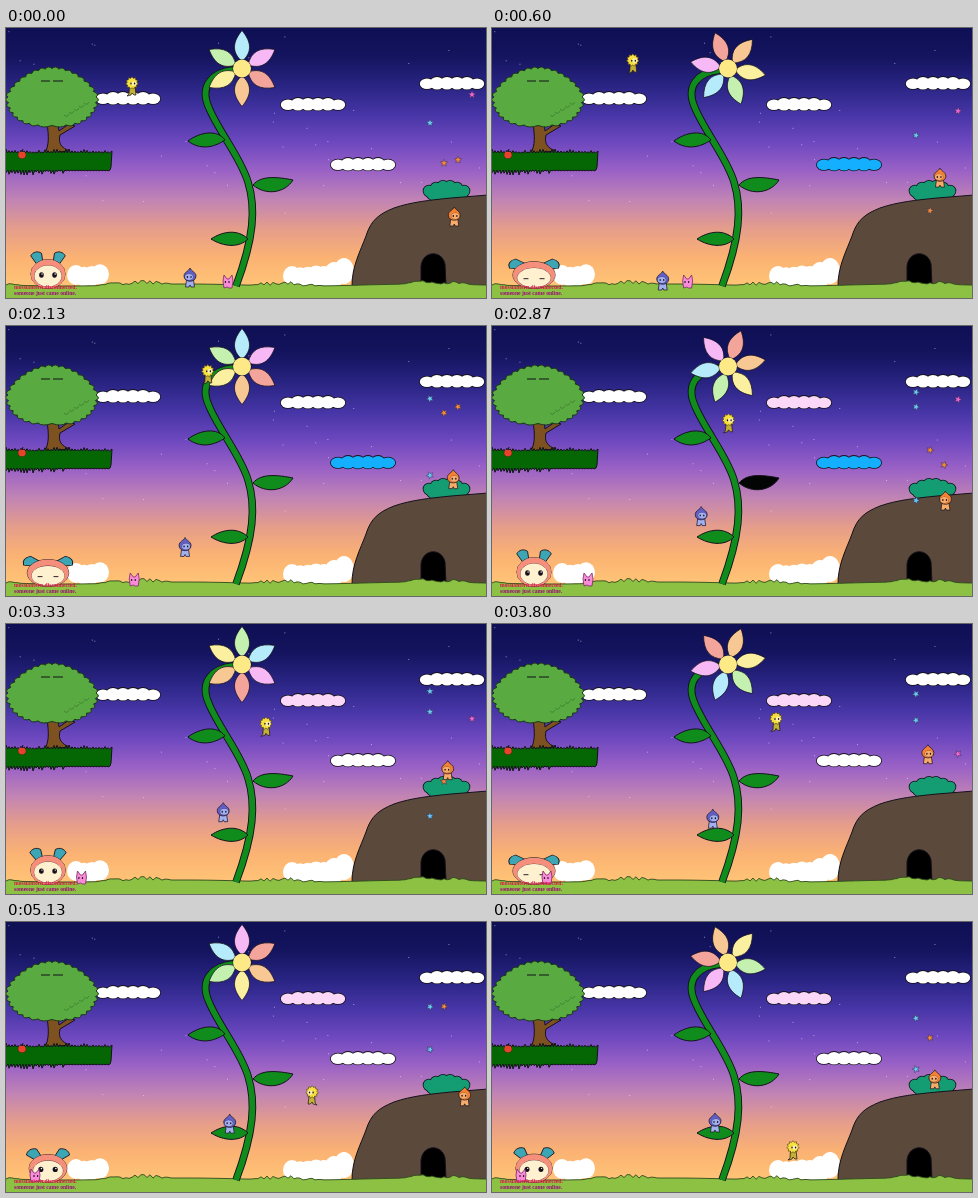
An HTML page with a canvas for the animation above (5870 ms loop, 480 by 270 pixels).

```html
<!DOCTYPE html>
<html lang="en">
<head>
<meta charset="utf-8">
<style>
html, body { margin: 0; width: 100%; height: 100%; overflow: hidden; }
canvas { display: block; width: 480px; height: 270px; }
</style>
</head>
<body>
<canvas id="stage" width="480" height="270"></canvas>
<script>
const c = document.getElementById('stage').getContext('2d');
const LOOP = 5870, STEP = 200 / 3, LAST = 87, TAU = Math.PI * 2;
const INK = '#15111c', GREEN = '#0f8c1c';

function shape(d, fill, line = INK, width = 1) {
  const p = new Path2D(d);
  if (fill) { c.fillStyle = fill; c.fill(p); }
  if (line) { c.strokeStyle = line; c.lineWidth = width; c.stroke(p); }
}

function oval(x, y, rx, ry, fill, line = INK, width = 0.8) {
  c.beginPath();
  c.ellipse(x, y, rx, ry, 0, 0, TAU);
  if (line) { c.strokeStyle = line; c.lineWidth = width; c.stroke(); }
  c.fillStyle = fill;
  c.fill();
}

// Several ovals joined under one outline
function blob(fill, ovals) {
  for (const o of ovals) oval(...o, INK, INK, 1.6);
  for (const o of ovals) oval(...o, fill, null);
}

function at(x, y, draw, sx = 1, sy = 1, turn = 0) {
  c.save();
  c.translate(x, y);
  c.rotate(turn);
  c.scale(sx, sy);
  draw();
  c.restore();
}

// Closed outline with count corners, alternating between two radii
function spiky(count, outer, inner) {
  let d = 'M';
  for (let i = 0; i < count * 2; i++) {
    const r = i % 2 ? inner : outer, a = i * Math.PI / count;
    d += `${i ? 'L' : ''}${Math.sin(a) * r} ${-Math.cos(a) * r}`;
  }
  return d + 'Z';
}

const repeat = (count, make) => Array.from({ length: count }, (_, i) => make(i));
const noise = i => Math.abs(Math.sin(i * 12.9898) * 43758.5453) % 1;
const during = (n, from, to, color, rest) => n >= from && n < to ? color : rest;

// Smooth curve through evenly timed points
function spline(points, n) {
  const t = n / LAST * (points.length - 1);
  const i = Math.min(points.length - 2, Math.floor(t)), k = t - i;
  const p = j => points[Math.max(0, Math.min(points.length - 1, i + j))];
  return [0, 1].map(v => {
    const a = p(-1)[v], b = p(0)[v], e = p(1)[v], f = p(2)[v];
    return b + k / 2 * (e - a + k * (2 * a - 5 * b + 4 * e - f + k * (3 * (b - e) + f - a)));
  });
}

const sky = c.createLinearGradient(0, 0, 0, 258);
['#0f0f54', '#14145f', '#292483', '#4635a6', '#6e48bf', '#9b62c6', '#c184b4', '#e59d8b', '#fbb273', '#ffc476']
  .forEach((color, i) => sky.addColorStop(i / 9, color));

function backdrop() {
  c.fillStyle = sky;
  c.fillRect(0, 0, 480, 270);
  c.fillStyle = 'rgba(255,255,255,.5)';
  for (let i = 1; i < 36; i++) c.fillRect(noise(i) * 480, noise(i + 50) * 190, 1, 1);
  for (const x of [61, 277]) {
    const size = x < 100 ? 1 : 0.8;
    for (let i = 0; i < 4; i++) oval(x + 9 + i * 8, 252 - noise(i + 3) * 9 * size, 9, 10, '#fff', null);
  }
  for (let i = 0; i < 3; i++) oval(318 + i * 10, 251 - i * 4, 10, 13, '#fff', null);
}

function cloud(x, y, fill) {
  blob(fill, repeat(6, i => [x + 7 + i * 10, y + 0.8 - (i % 5 ? 0.6 : 0), 7.2, i % 5 ? 6.3 : 5.2]));
}

function clouds(n) {
  cloud(90, 70, '#fff');
  cloud(275, 76, during(n, 33, 88, '#fbd8f7', '#fff'));
  cloud(325, 136, during(n, 4, 50, '#14b0ff', '#fff'));
  cloud(414, 55, '#fff');
}

function tree() {
  shape('M39 125C43 117 43 109 41 95L52 95L53 103L63 96L69 98L54 107C52 115 55 120 64 123Z', '#7e5220');
  const edge = (i, grow) => {
    const a = i * TAU / 32, up = Math.sin(a), side = Math.cos(a);
    const wide = up > 0 ? Math.sign(side) * Math.abs(side) ** 0.7 : side * (1 + up * 0.22);
    return `${46 + wide * 44 * grow} ${69 + up * 28.5 * grow}`;
  };
  let d = 'M' + edge(0, 1);
  for (let i = 1; i <= 32; i++) d += `Q${edge(i - 0.5, 1.12)} ${edge(i, 1)}`;
  shape(d + 'Z', '#59aa40', '#1d3518');
  for (let i = 0; i < 5; i++) shape(`M${58 + i * 5} ${87 - i * 3}q3 3 5-1`, null, '#3d7c30', 0.8);
  shape('M35 53h9M47 53h10', null, INK, 1.2);
}

function ledge() {
  let top = 'M-2 146L-2 124', under = '';
  for (let x = 0; x <= 104; x += 3) {
    top += `L${x} ${121 + noise(x) * 3}L${x + 1.5} 125`;
    under = `L${x + 2} 142L${x} ${143 + noise(x + 9) * 4 * (x < 60)}` + under;
  }
  shape(top + 'L106 123L105 139' + under + 'Z', '#056604');
  oval(16, 127, 3.8, 3.4, '#e8432a');
  shape('M16 124L17 121', null);
}

function hill() {
  blob('#149d72', repeat(6, i => [423 + i * 7, 163 - 5 * Math.sin(i * Math.PI / 5), 5.5, 5.5])
    .concat([[441, 167, 20, 8]]));
  shape('M346 258C346 238 354 224 360 208C365 192 373 186 388 180C405 174 425 172 445 170L482 167L482 258Z', '#5b4a3c');
  shape('M415 257L415 238C417 222 436 222 439 236L440 257Z', '#000');
}

function ground() {
  let d = 'M-2 272L-2 257';
  for (let x = 0; x <= 484; x += 3) {
    const tuft = Math.max(0, Math.sin(x / 24 + 2.5)) * noise(x) * 5;
    d += `L${x} ${257 + Math.sin(x / 38) - tuft}`;
  }
  shape(d + 'L484 272Z', '#8cc144', '#2f4a1c', 0.9);
}

const petals = ['#f3a59b', '#f7c794', '#fbf0a0', '#c4f0b0', '#b6ebfb', '#f6b9f5'];

function flower(n) {
  const stem = 'M228 42C206 44 193 58 203 80C213 104 235 130 242 154C250 180 248 210 230 258';
  shape(stem, null, INK, 7.6);
  shape(stem, null, GREEN, 5.8);
  shape('M219 112C211 101 194 104 182 113C194 122 207 120 219 112Z', during(n, 16, 29, '#08300f', GREEN));
  shape('M247 157C255 147 272 149 287 152C279 165 260 168 247 157Z', during(n, 36, 49, '#030504', GREEN));
  shape('M242 211C232 201 217 203 205 211C218 219 233 220 242 211Z', GREEN);
  const turn = Math.floor(6.89 + 1.124 * n) * TAU / 18;
  petals.forEach((fill, i) => at(236, 40.5,
    () => shape('M0-7C-10-16-10-26 0-38C10-26 10-16 0-7Z', fill, INK, 0.7), 1, 1, turn + i * TAU / 6));
  oval(236, 40.5, 9, 9, '#fdea86');
}

// Each column drops stars that speed up as they fall
const columns = [
  { color: '#67c9f5', speed: 0.117, births: [-46, 10, 40] },
  { color: '#f58a35', speed: 0.277, births: [-30, 15.5, 61.5] },
  { color: '#f58a35', speed: 0.427, births: [-19, 23] },
  { color: '#f264d2', speed: 0.375, births: [-2, 35.7] }
];

function fallingStars(n) {
  columns.forEach(({ color, speed, births }, i) => {
    for (const born of births) {
      const y = 66 + (speed * (n - born)) ** 2;
      if (n >= born && y < 197) {
        at(424 + i * 14, y, () => shape(spiky(5, 3.8, 1.7), color, '#3b3158', 0.5), 1, 1, n * 0.3);
      }
    }
  });
}

function eyes(y) {
  oval(-1, y, 0.7, 1, INK, null);
  oval(2.6, y, 0.7, 1, INK, null);
}

function bulbHead(fill, pale) {
  shape('M-3.5 2L-4.5 9L-1 9L0 7L1 9L4.5 9L3.5 2Z', pale, INK, 0.7);
  shape('M0-10C1-7 6-6 6-2C6 5-6 5-6-2C-6-6-1-7 0-10Z', fill, INK, 0.7);
  oval(1, -1, 4, 3, pale, INK, 0.4);
  eyes(-1);
}

function spikyHead() {
  shape('M-2.5 0L-3 8L-5 10L-1 9L0 7L2 9L4 9L3 0Z', '#c3b034', INK, 0.7);
  at(0, -3, () => shape(spiky(11, 6.3, 4.8), '#f6e03f', '#4a3d12', 0.6));
  oval(2, -2.5, 2.6, 2.3, '#fbeeb0', null);
  eyes(-2.5);
}

function bunny() {
  shape('M-4 6L-5-1L-4-7L-1-3L1-3L4-7L5-1L4 6L1 5L-1 6Z', '#f98bd8', '#7b2a68', 0.8);
  eyes(0);
}

const walkers = [
  { body: () => bulbHead('#f48232', '#f8ac6c'),
    place: n => [440 + 0.12 * n + 11 * Math.cos((n - 4) * TAU / 35), 189 - 60 * Math.abs(Math.sin(0.0785 * n))] },
  { body: spikyHead,
    place: n => spline([[126, 58], [172, 11], [238, 98], [304, 105], [301, 228]], n) },
  { body: () => bulbHead('#625fc4', '#a3b0f0'),
    place: n => spline([[184, 250], [157, 250], [210, 190], [223, 202], [223, 201]], n) },
  { body: bunny,
    place: n => [Math.max(29, 222 - 2.93 * n), 254] }
];

function bigHead(n) {
  const squash = Math.exp(-(((n % 24 - 9.5) / 5) ** 2));
  at(42, 259, () => {
    for (const side of [-1, 1]) {
      at(side * 7, -23, () => shape('M-2 1L-4-10C-1-14 4-14 7-11L3 2Z', '#3da6b5', INK, 0.8),
        side, 1, side * (0.3 + squash * 0.9));
    }
    oval(0, -13, 17, 14.5, '#f58f7c');
    oval(0, -11 + squash, 13.5, 10.5, '#fff0cf', INK, 0.6);
    for (const x of [-6.5, 6.5]) {
      if (squash > 0.6) {
        shape(`M${x - 2}-9h4`, null, INK, 1);
      } else {
        oval(x, -12, 2.3, 2.7, INK, null);
        oval(x + 0.6, -13, 0.7, 0.7, '#fff', null);
      }
    }
  }, 1 + squash * 0.24, 1 - squash * 0.08);
}

function messages() {
  c.font = 'bold 5.6px "Liberation Serif", serif';
  c.fillStyle = '#dc1648';
  c.fillText('mosslantern disconnected.', 8, 261);
  c.fillStyle = '#9c0d78';
  c.fillText('someone just came online.', 8, 267);
}

function draw(n) {
  c.lineJoin = 'round';
  backdrop();
  clouds(n);
  tree();
  ledge();
  hill();
  ground();
  flower(n);
  fallingStars(n);
  bigHead(n);
  for (const { body, place } of walkers) {
    const [x, y] = place(n), side = place(n + 1)[0] < x ? -1 : 1;
    at(x, y, body, side);
  }
  messages();
}

let shown = -1;
function tick() {
  const n = Math.min(LAST, Math.floor((performance.now() % LOOP + 4) / STEP));
  if (n !== shown) draw(shown = n);
  requestAnimationFrame(tick);
}
tick();
</script>
</body>
</html>
```
